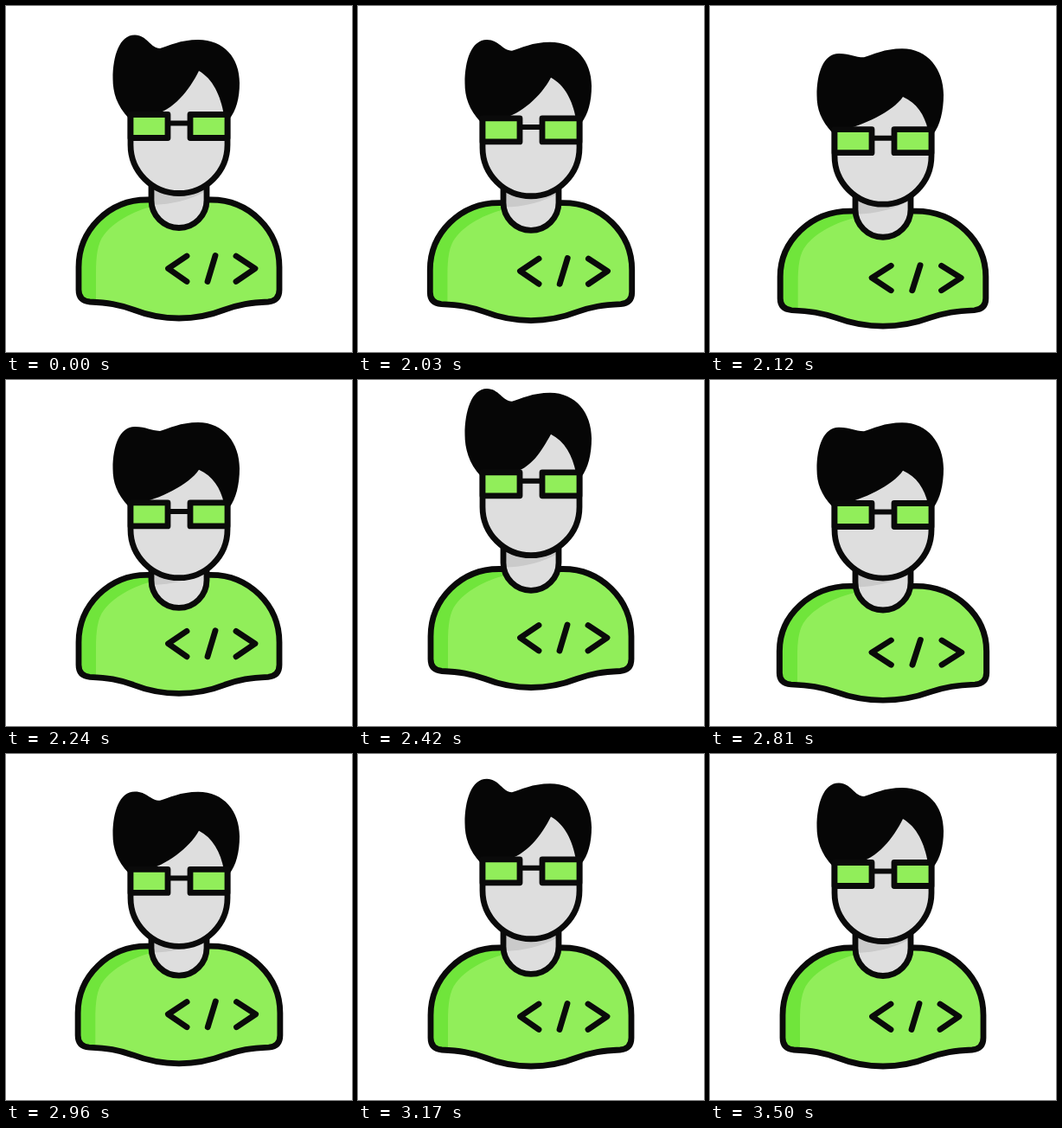
An HTML page that plays this animation: 400x400 px, repeating every 3.53 s.

```html
<!DOCTYPE html>
<html>
<head>
<meta charset="utf-8">
<style>
  html, body { margin: 0; height: 100%; overflow: hidden; background: #fff; }
  svg { display: block; width: 100vw; height: 100vh; }
  .line { stroke: #0a0a0a; stroke-width: 6.8; stroke-linecap: round; stroke-linejoin: round; }
</style>
</head>
<body>
<svg viewBox="0 0 400 400" fill="none">
  <defs>
    <path id="torso" d="M163 224C119 224 84 259 84 302V328Q84 341 97 342C118 343 130 345 147 351C165 358 183 361 200 361S235 358 253 351C270 345 282 343 303 342Q316 341 316 328V302C316 259 281 224 237 224Z"/>
    <path id="throat" d="M168 180V224.500A32 32 0 0 0 232 224.500V180"/>
  </defs>
  <g id="body">
    <use href="#torso" fill="#91ee5a"/>
    <path fill="#70e53b" d="M172 224H163C119 224 84 259 84 302V328Q84 341 97 342H104V310C104 288 106 274 113 265C124 250 146 237 172 231Z"/>
    <use href="#torso" class="line"/>
    <path class="line" d="M209 289L187.500 303.500L209 318.500M242 288.500L233 318.500M266 289L288 303.500L266 318.500"/>
  </g>
  <g id="neck">
    <use href="#throat" fill="#dedede"/>
    <path fill="#cacaca" d="M168 190H231V214Q205 229 168 230Z"/>
    <use href="#throat" class="line"/>
  </g>
  <path id="face" fill="#dedede"/>
  <path id="jaw" class="line"/>
  <path id="hair" fill="#060606"/>
  <g id="glasses" class="line">
    <path stroke-width="6" d="M187 135.500H213"/>
    <path fill="#91ee5a" d="M144 125.500H187V152.500H144ZM213 125.500H256V152.500H213Z"/>
  </g>
</svg>
<script>
const LOOP = 3530, REST = 2000, STEP = 30;

// Turning points of the two bounces: [step, vertical offset]
const bodyTurns = [[0, 0], [3, 11.5], [12, -6], [16, -5], [27, 11.5], [33, -3.7], [43, 2], [50, 0]];
const neckTurns = [[0, 0], [3, 11], [6, 10], [15, -14], [26, 10], [35, -4], [45, 1.5], [50, 0]];
const headTurns = [[0, 0], [3, 17], [7, 18], [15.5, -22], [25, 17], [27, 17], [38, -4], [45, 1], [50, 0]];

const part = id => document.getElementById(id);
const shift = (id, y) => part(id).setAttribute('transform', `translate(0 ${y})`);
const shape = (id, d) => part(id).setAttribute('d', d);

// Eases in and out between neighbouring turning points
function follow(turns, step) {
  const next = turns.findIndex(([at], i) => i && step <= at);
  const [t0, y0] = turns[next - 1], [t1, y1] = turns[next];
  const u = (step - t0) / (t1 - t0);
  return y0 + (y1 - y0) * u * u * (3 - 2 * u);
}

const pulse = (step, center, width) => Math.max(0, 1 - ((step - center) / width) ** 2) ** 2;

function hairPath(head) {
  // The head nods: crown and fringe move unequally up and down
  const tilt = Math.abs(head);
  const quiff = 1.25 * head, crown = .95 * head - .35 * tilt, fringe = 1.2 * head + .55 * tilt;
  const left = (head + quiff) / 2, right = (head + crown) / 2;
  const tip = 75 + fringe, brow = 126 + head, drop = brow - tip, end = 170 - .6 * fringe;
  return `M142 ${130 + head}C128 ${115 + head} 123.500 ${100 + left} 123.500 ${84 + left}
    C123.500 ${58 + left} 131 ${33.5 + quiff} 149 ${33.5 + quiff}
    C163 ${33.5 + quiff} 167 ${49 + crown} 178 ${49 + crown}
    C188 ${46 + crown} 202 ${39 + crown} 222 ${39 + crown}
    C252 ${39 + crown} 270 ${60 + right} 270 ${89 + right}
    C270 ${107 + right} 266 ${121 + head} 258 ${131 + head}
    L252 ${brow}C248 ${tip + .55 * drop} 239 ${tip + .18 * drop} 223 ${tip}
    C212 ${tip + .44 * drop} ${end + 23} ${brow - .1 * drop} ${end} ${brow}Z`;
}

function draw(now) {
  const step = Math.max(0, Math.floor((now % LOOP - REST) / STEP));
  const body = follow(bodyTurns, step), head = follow(headTurns, step);
  const squash = 3 * pulse(step, 3.5, 3.5) + 4 * pulse(step, 28, 5.5);
  part('body').setAttribute('transform',
    `translate(200 ${300 + body}) scale(${1 + squash / 119} ${1 - squash / 100}) translate(-200 -300)`);
  shift('neck', follow(neckTurns, step));
  shift('glasses', head);
  const cheek = 160.5 + .74 * head, jaw = `V${cheek}a56 56 0 0 0 112 0V`;
  shape('face', `M144 ${100 + head}${jaw}${100 + head}L223 ${70 + head}Z`);
  shape('jaw', `M144 ${127 + head}${jaw}${127 + head}`);
  shape('hair', hairPath(head));
}

const start = performance.now();
function tick() {
  draw(performance.now() - start);
  requestAnimationFrame(tick);
}
tick();
</script>
</body>
</html>
```
